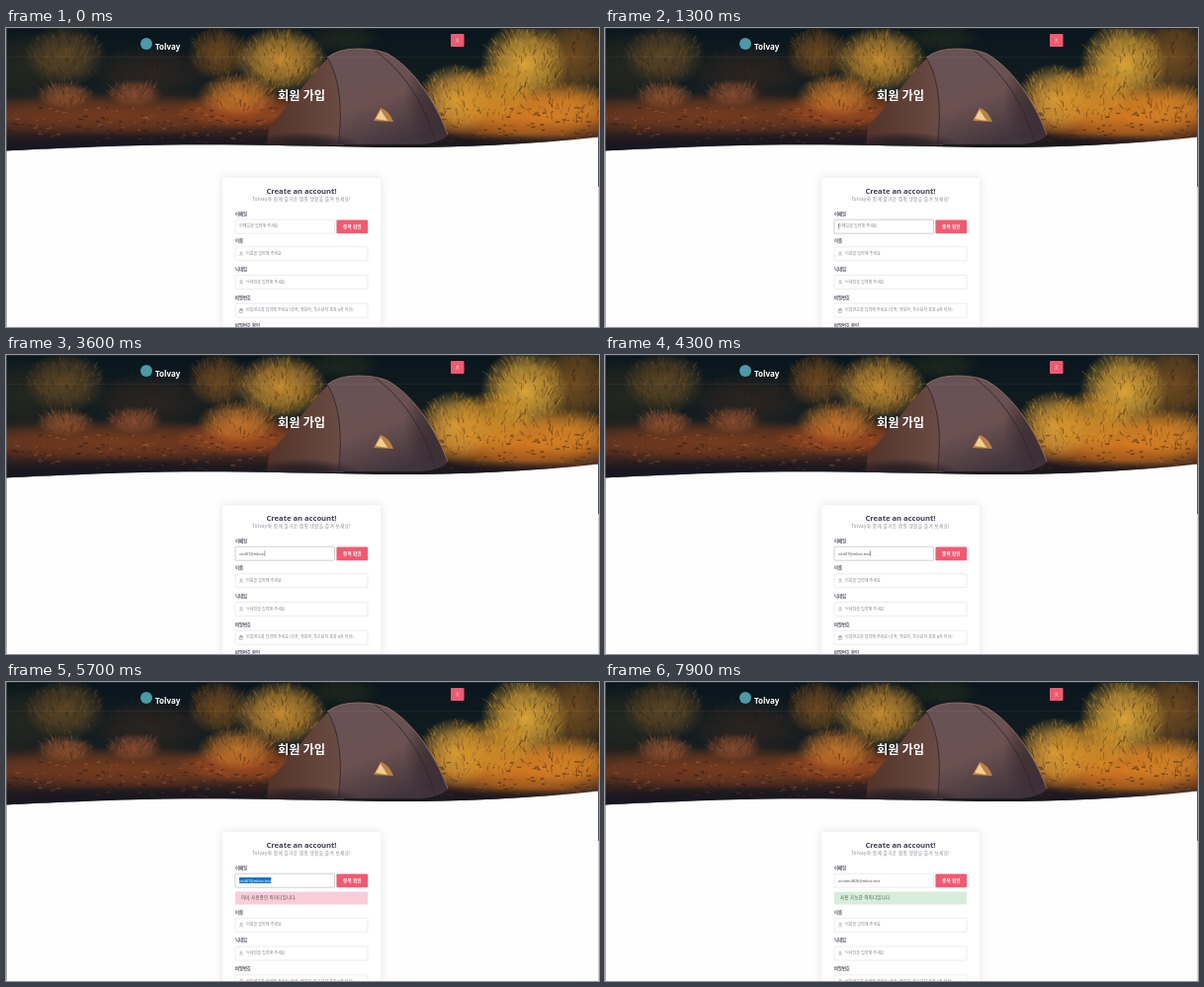
Recreate the animation shown at these times as an HTML page with a canvas. Size 600 px wide and 303 px high, loop 8 s.

```html
<!DOCTYPE html>
<html lang="ko">
<head>
<meta charset="utf-8">
<title>회원 가입</title>
<style>
html, body { margin: 0; width: 100%; height: 100%; overflow: hidden; background: #fff; }
canvas { display: block; width: 600px; height: 303px; }
</style>
</head>
<body>
<canvas id="stage" width="600" height="303"></canvas>
<script>
const W = 600, H = 303, LOOP = 8000, STEP = 100;
const FONT = '"Noto Sans", "Noto Sans CJK KR", "Noto Sans CJK", sans-serif';
const BRAND = 'Tolvay';
const FIRST_MAIL = 'visit07@mbox.test';
const SECOND_MAIL = 'orvamt4826@mbox.test';
const PINK = '#f15a70', HOVER = '#ee3450';
const LABEL = '#494758', HINT = '#85858f', LINE = '#e6e6ea';
const ctx = document.getElementById('stage').getContext('2d');

function text(c, str, x, y, size, color, { bold = false, align = 'left', spacing = 0 } = {}) {
  c.font = `${bold ? 700 : 400} ${size}px ${FONT}`;
  c.letterSpacing = spacing + 'px';
  c.textAlign = align;
  c.textBaseline = 'alphabetic';
  c.fillStyle = color;
  c.fillText(str, x, y + size * 0.36);
}

function box(c, x, y, w, h, fill, stroke, radius = 1) {
  c.beginPath();
  c.roundRect(x, y, w, h, radius);
  if (fill) { c.fillStyle = fill; c.fill(); }
  if (stroke) { c.strokeStyle = stroke; c.lineWidth = 0.7; c.stroke(); }
}

function person(c, x, y, color) {
  c.strokeStyle = color;
  c.lineWidth = 0.5;
  c.beginPath();
  c.arc(x, y - 1, 1, 0, Math.PI * 2);
  c.moveTo(x - 1.8, y + 2);
  c.quadraticCurveTo(x, y - 0.9, x + 1.8, y + 2);
  c.stroke();
}

function lock(c, x, y, color) {
  c.strokeStyle = color;
  c.lineWidth = 0.5;
  c.strokeRect(x - 1.6, y - 0.4, 3.2, 2.4);
  c.strokeRect(x - 1, y - 2, 2, 1.6);
}

function randomizer(seed) {
  return () => {
    seed = (seed * 1664525 + 1013904223) >>> 0;
    return seed / 4294967296;
  };
}

function glow(c, x, y, rx, ry, color, alpha) {
  c.save();
  c.translate(x, y);
  c.scale(rx, ry);
  const g = c.createRadialGradient(0, 0, 0, 0, 0, 1);
  g.addColorStop(0, color);
  g.addColorStop(0.55, color + 'aa');
  g.addColorStop(1, color + '00');
  c.globalAlpha = alpha;
  c.fillStyle = g;
  c.fillRect(-1, -1, 2, 2);
  c.restore();
}

// Soft mass of colour with fanned blades over it.
function bush(c, rnd, x, y, rx, ry, color, count, alpha) {
  glow(c, x, y, rx, ry, color, alpha);
  c.lineWidth = 0.7;
  for (let i = 0; i < count; i++) {
    const a = rnd() * Math.PI * 2, r = Math.sqrt(rnd()) * 0.85;
    const bx = x + Math.cos(a) * rx * r, by = y + Math.sin(a) * ry * r;
    const len = 2 + rnd() * 6;
    const lean = (bx - x) / rx * 0.8 + (rnd() - 0.5);
    c.globalAlpha = 0.2 + rnd() * 0.45;
    c.strokeStyle = rnd() < 0.35 ? '#24160f' : color;
    c.beginPath();
    c.moveTo(bx, by);
    c.quadraticCurveTo(bx + lean * 2, by - len * 0.6, bx + lean * len, by - len);
    c.stroke();
  }
  c.globalAlpha = 1;
}

function tent(c) {
  const flank = new Path2D('M328 28 C308 48 287 78 266 100 L264 119 H342 L338 60Z');
  const dome = new Path2D('M325 30 Q336 21 356 21 Q374 21 386 26 C408 38 432 68 447 108 Q441 116 420 118 H336 C341 85 338 50 325 30Z');
  const side = c.createLinearGradient(270, 0, 340, 0);
  side.addColorStop(0, '#53352c');
  side.addColorStop(1, '#6b4c45');
  c.fillStyle = side;
  c.fill(flank);
  const shade = c.createLinearGradient(350, 22, 385, 120);
  shade.addColorStop(0, '#675256');
  shade.addColorStop(0.55, '#6c5150');
  shade.addColorStop(1, '#41353d');
  c.fillStyle = shade;
  c.fill(dome);
  c.save();
  c.clip(dome);
  glow(c, 435, 72, 32, 55, '#372a30', 0.8);
  c.restore();
  glow(c, 300, 120, 60, 15, '#17171f', 0.9);
  c.lineWidth = 0.9;
  c.strokeStyle = '#33272b';
  c.stroke(new Path2D('M325 30 C338 50 341 85 336 118 M372 22 C400 42 423 74 434 114'));
  c.strokeStyle = '#94705f';
  c.stroke(new Path2D('M325 30 Q336 21 356 21 Q374 21 386 26 C408 38 432 68 447 108'));
  c.fillStyle = '#b98249';
  c.fill(new Path2D('M372 94 L379 81 Q387 83 392 95Z'));
  c.fillStyle = '#f2cf8c';
  c.fill(new Path2D('M374 92 L379 83 L386 94Z'));
}

function hero(c) {
  const rnd = randomizer(41);
  c.save();
  c.clip(new Path2D('M0 0H600V110.5C520 119 445 121.5 380 121C300 119.5 230 117.5 160 118.5C100 119.5 40 122.5 0 124.5Z'));
  const sky = c.createLinearGradient(0, 0, 0, 125);
  sky.addColorStop(0, '#08161d');
  sky.addColorStop(0.5, '#141d20');
  sky.addColorStop(0.72, '#4a2b1d');
  sky.addColorStop(1, '#191720');
  c.fillStyle = sky;
  c.fillRect(0, 0, W, 126);

  glow(c, 110, 88, 190, 22, '#82401f', 0.75);
  glow(c, 245, 84, 75, 20, '#a94e20', 0.8);
  glow(c, 530, 90, 115, 29, '#d47720', 1);
  const bushes = [
    [18, 38, 48, 38, '#2c2c20', 80, 0.7],
    [60, 28, 42, 32, '#715126', 190, 0.75],
    [145, 45, 65, 28, '#3b2a20', 120, 0.6],
    [215, 26, 32, 28, '#80521f', 150, 0.8],
    [278, 32, 48, 34, '#c28a2f', 300, 1],
    [235, 68, 42, 22, '#ca792b', 170, 0.9],
    [130, 66, 29, 14, '#9d5532', 100, 0.75],
    [60, 68, 30, 14, '#a35a31', 90, 0.75],
    [340, 10, 40, 15, '#28301f', 60, 0.6],
    [575, 28, 45, 45, '#79501f', 200, 0.9],
    [525, 37, 45, 45, '#dba335', 330, 1],
    [455, 72, 38, 36, '#d59a35', 220, 1],
    [492, 68, 45, 32, '#dc9629', 180, 0.85],
    [565, 78, 52, 25, '#d68425', 180, 0.9]
  ];
  for (const b of bushes) bush(c, rnd, ...b);
  for (let i = 0; i < 420; i++) {
    const x = rnd() * W, y = 80 + rnd() * 36;
    c.fillStyle = rnd() < 0.5 ? '#ba693566' : '#17141a77';
    c.fillRect(x, y, 1 + rnd() * 4, 0.7 + rnd());
  }
  glow(c, 130, 123, 260, 18, '#15161f', 0.95);
  glow(c, 470, 121, 170, 14, '#1a171d', 0.95);
  tent(c);
  c.fillStyle = '#ffffff12';
  c.fillRect(0, 29, W, 0.7);
  c.restore();

  c.fillStyle = '#4b9aa5';
  c.beginPath();
  c.arc(142, 16, 6, 0, Math.PI * 2);
  c.fill();
  text(c, BRAND, 151, 18.7, 8, '#fff', { bold: true });
  box(c, 450, 6, 13.5, 13, PINK);
  person(c, 456.7, 12.7, '#ffd9df');
  text(c, '회원 가입', 299, 68.8, 12.2, '#fff', { bold: true, align: 'center' });
}

function makeBackdrop() {
  const layer = document.createElement('canvas');
  layer.width = W;
  layer.height = H;
  const c = layer.getContext('2d');
  c.fillStyle = '#fefefe';
  c.fillRect(0, 0, W, H);
  hero(c);
  c.save();
  c.shadowColor = '#7a4a8a2b';
  c.shadowBlur = 8;
  box(c, 219, 152, 160, 170, '#fff', null, 2);
  c.restore();
  text(c, 'Create an account!', 299, 165.4, 7.6, '#403d50', { bold: true, align: 'center' });
  text(c, `${BRAND}와 함께 즐거운 캠핑 생활을 즐겨 보세요!`, 299, 173.4, 4.6, '#8b8a96',
    { align: 'center', spacing: 0.35 });
  text(c, '이메일', 232, 188.5, 4.4, LABEL, { bold: true });
  c.fillStyle = '#26282b';
  c.fillRect(0, 0, W, 0.8);
  c.fillStyle = '#77777c';
  c.fillRect(0, 0, 0.6, H);
  c.fillStyle = '#d5d5d8';
  c.fillRect(599, 111, 1, H);
  c.fillStyle = '#55555a';
  c.fillRect(599, 100, 1, 61);
  return layer;
}

function field(label, hint, top, icon) {
  text(ctx, label, 232, top - 6.2, 4.3, LABEL, { bold: true });
  box(ctx, 232, top, 134, 14, '#fff', LINE);
  icon(ctx, 238, top + 7, HINT);
  text(ctx, hint, 243, top + 6.7, 4.05, HINT);
}

function emailField(t) {
  const focused = (t >= 1000 && t < 4600) || (t >= 5500 && t < 7700);
  const selected = t >= 5600 && t < 6000;
  const typed = t < 6000
    ? FIRST_MAIL.slice(0, Math.max(0, Math.floor((t - 1900) / 130)))
    : SECOND_MAIL.slice(0, Math.floor((t - 6000) / 75));
  const size = 3.75;

  box(ctx, 232, 194.2, 100.5, 14, '#fff', focused ? '#babbc3' : LINE);
  ctx.font = `400 ${size}px ${FONT}`;
  ctx.letterSpacing = '0px';
  const width = ctx.measureText(typed).width;
  if (selected) {
    ctx.fillStyle = '#1677cc';
    ctx.fillRect(236, 198, width, 6);
  }
  if (typed) text(ctx, typed, 236, 201.2, size, selected ? '#fff' : '#4c4f57');
  else text(ctx, '이메일을 입력해 주세요', 236, 200.9, 4.05, HINT);

  const typing = (t >= 1900 && t < 4200) || (t >= 6000 && t < 7700);
  const blinkOn = (t - 1000) % 1000 < 500;
  if (focused && !selected && (typing || blinkOn)) {
    ctx.fillStyle = '#444';
    ctx.fillRect(236 + width, 198.2, 0.5, 5.6);
  }
}

function pointer(x, y) {
  const hand = new Path2D('M0 0Q1 -1 1.5 0V2L4 2.7V5L3 7H0L-2 4L-1 3L0 4Z');
  ctx.save();
  ctx.translate(x, y);
  ctx.fillStyle = '#fff';
  ctx.strokeStyle = '#222';
  ctx.lineWidth = 0.6;
  ctx.fill(hand);
  ctx.stroke(hand);
  ctx.restore();
}

function alertBox(message, fill, color) {
  box(ctx, 232, 212.5, 134, 13, fill);
  text(ctx, message, 238, 218.8, 4.3, color, { spacing: 0.35 });
}

const backdrop = makeBackdrop();

function draw(t) {
  ctx.drawImage(backdrop, 0, 0);
  const hover = t >= 4500 && t < 5300;
  const alerted = t >= 4800;
  const shift = alerted ? 17.5 : 0;

  emailField(t);
  box(ctx, 334.4, 194.4, 31.6, 13.8, hover ? HOVER : PINK);
  text(ctx, '중복 확인', 350.3, 201, 4.7, '#fff', { bold: true, align: 'center' });

  if (t >= 7700) alertBox('사용 가능한 아이디입니다.', '#d7eddc', '#3f5547');
  else if (alerted) alertBox('이미 사용중인 아이디입니다.', '#f8cdd9', '#59434d');

  field('이름', '이름을 입력해 주세요', 221.7 + shift, person);
  field('닉네임', '닉네임을 입력해 주세요', 250.5 + shift, person);
  field('비밀번호', '비밀번호를 입력해 주세요 (숫자, 영문자, 특수문자 포함 8자 이상)', 279.3 + shift, lock);
  text(ctx, '비밀번호 확인', 232, 301.9 + shift, 4.3, LABEL, { bold: true });
  if (hover) pointer(360.5, 199.5);
}

function frame() {
  const t = performance.now() % LOOP;
  draw(Math.floor(t / STEP) * STEP);
  requestAnimationFrame(frame);
}
frame();
</script>
</body>
</html>
```
